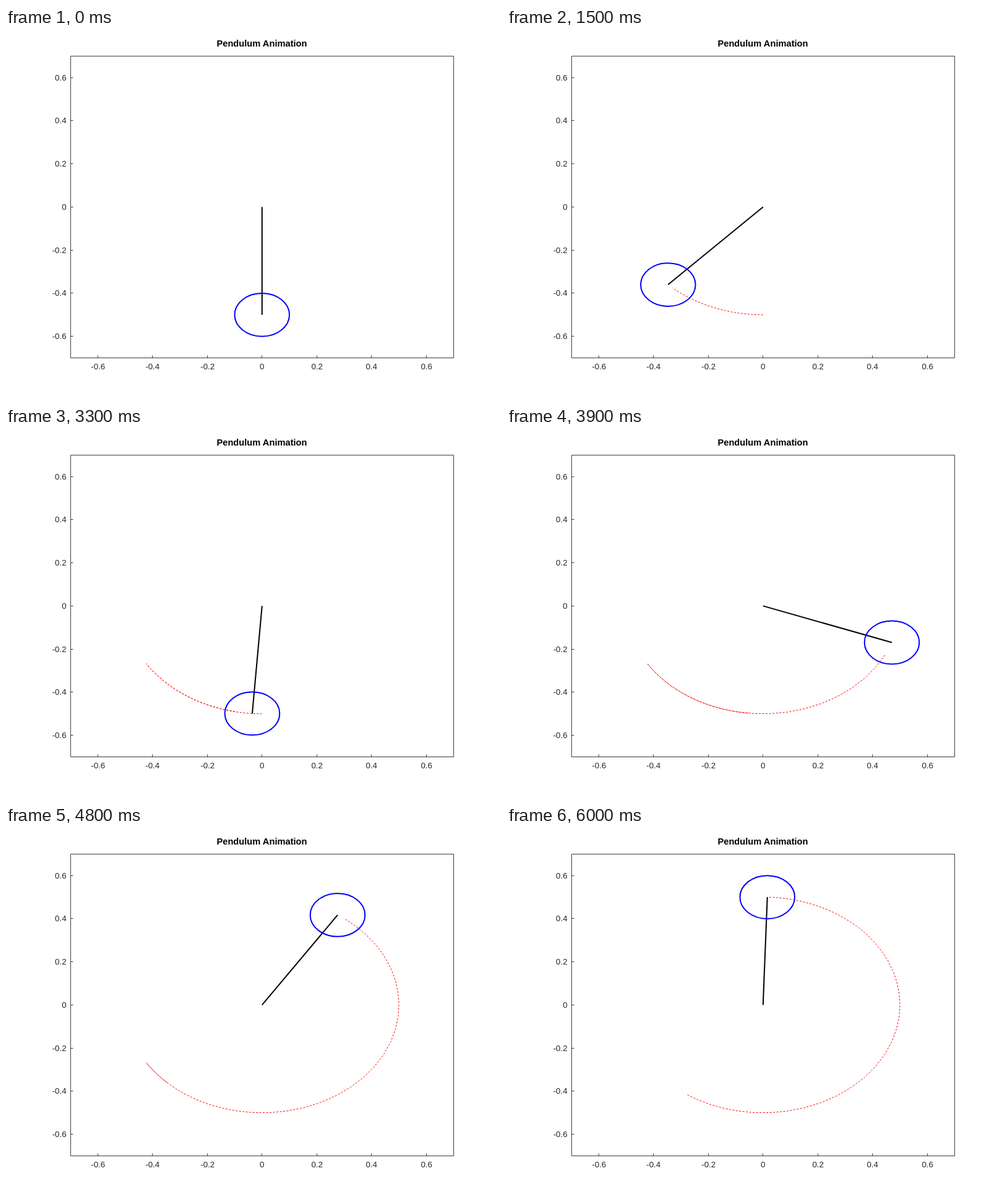
Recreate the animation shown at these times as an HTML page. Size 800 px wide and 600 px high, loop 6300 ms.

```html
<!DOCTYPE html>
<html lang="en">
<head>
<meta charset="utf-8">
<title>Pendulum Animation</title>
<style>
  html, body { margin: 0; width: 100%; height: 100%; overflow: hidden; background: #fff; }
  svg { display: block; }
  text { font: 13.33px "Liberation Sans", Arial, sans-serif; fill: #262626; }
  .title { font-size: 14.67px; font-weight: bold; fill: #000; text-anchor: middle; }
  .x { text-anchor: middle; }
  .y { text-anchor: end; }
  #axes { fill: none; stroke: #262626; stroke-width: .9; }
  #trail { fill: none; stroke: #f00; stroke-width: 1; stroke-dasharray: 3 2.5; }
  #rod { stroke: #000; stroke-width: 2; }
  #bob { fill: none; stroke: #00f; stroke-width: 2; }
</style>
</head>
<body>
<svg width="800" height="600" viewBox="0 0 800 600">
  <text class="title" x="413.5" y="30">Pendulum Animation</text>
  <path id="axes"/>
  <g id="labels"></g>
  <polyline id="trail"/>
  <line id="rod"/>
  <ellipse id="bob" rx="44.3" ry="34.9"/>
</svg>
<script>
  const $ = id => document.getElementById(id);
  const px = x => 413.8 + x * 442.6;
  const py = y => 289.4 - y * 348.9;

  // Swing angle in degrees from straight down, every fifth step
  const angles = [0, -1.25, -6.2, -16.2, -29.8, -43.9, -54.4, -57.6, -51.5, -33.5, -4.1,
    32.6, 70.2, 103, 128.5, 146.5, 159.6, 168.1, 174, 178.2, 181];
  const LENGTH = 0.5, STRIDE = 5, WINDOW = 50, FRAME_MS = 300;

  // Frames play in text order of their step numbers: 0, 10, 100, 15, ...
  const order = angles.map((_, i) => i * STRIDE).sort();

  function angleAt(step) {
    const last = angles.length - 1;
    const i = Math.min(Math.floor(step / STRIDE), last - 1);
    const u = step / STRIDE - i;
    const a = angles[Math.abs(i - 1)], b = angles[i], c = angles[i + 1];
    const d = angles[Math.min(i + 2, last)];
    return b + u / 2 * (c - a + u * (2 * a - 5 * b + 4 * c - d + u * (3 * (b - c) + d - a)));
  }

  function bobAt(step) {
    const r = angleAt(step) * Math.PI / 180;
    return [px(LENGTH * Math.sin(r)), py(-LENGTH * Math.cos(r))];
  }

  function set(id, attrs) {
    for (const key in attrs) $(id).setAttribute(key, attrs[key]);
  }

  function drawAxes() {
    let path = "M104.5 45.5H723.5V533.5H104.5Z", labels = "";
    for (let i = -3; i <= 3; i++) {
      const v = i / 5, x = Math.floor(px(v)) + .5, y = Math.floor(py(v)) + .5;
      path += `M${x} 533.5v-4M104.5 ${y}h4`;
      labels += `<text class="x" x="${x + .2}" y="552">${v}</text>` +
                `<text class="y" x="97.6" y="${y + 4.8}">${v}</text>`;
    }
    set("axes", { d: path });
    $("labels").innerHTML = labels;
  }

  function draw(step) {
    const [x, y] = bobAt(step);
    const points = [];
    for (let s = Math.max(0, step - WINDOW); s < step; s++) points.push(bobAt(s));
    set("trail", { points: points.join(" ") });
    set("rod", { x1: px(0), y1: py(0), x2: x, y2: y });
    set("bob", { cx: x, cy: y });
  }

  const start = performance.now();
  let shown = -1;
  function tick() {
    const frame = Math.floor((performance.now() - start) / FRAME_MS) % order.length;
    if (frame !== shown) draw(order[shown = frame]);
    requestAnimationFrame(tick);
  }

  drawAxes();
  tick();
</script>
</body>
</html>
```
